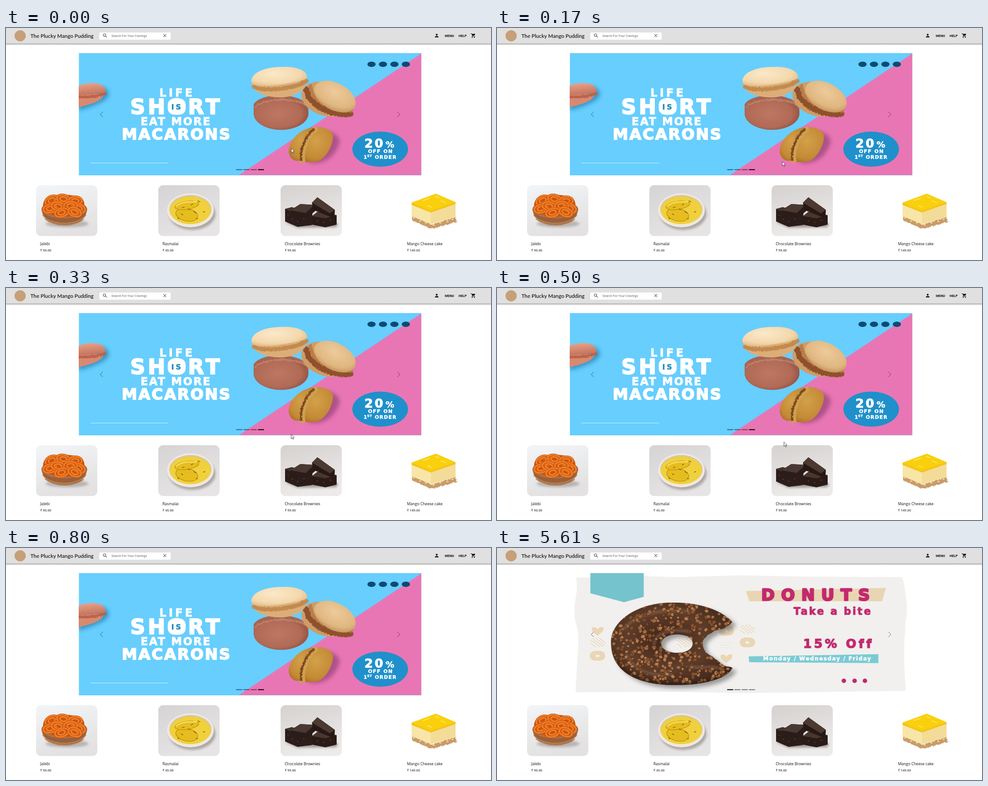
Animation, 1081 px wide and 518 px high, one loop 8 s. Source, as an HTML page:

```html
<!DOCTYPE html>
<html lang="en">
<head>
<meta charset="utf-8">
<title>Dessert shop</title>
<style>
html, body { margin: 0; width: 100%; height: 100%; overflow: hidden; background: #fff; }
svg { display: block; width: 100%; height: 100%; }
.brand { font: 600 11.7px Lato, sans-serif; fill: #1c1c1c; }
.hint { font: 7.1px Roboto, sans-serif; fill: #6a6a6a; }
.nav { font: 700 7.4px Roboto, sans-serif; fill: #111; }
.name { font: 500 8.6px "Open Sans", sans-serif; fill: #111; }
.price { font: 700 7.3px "Open Sans", sans-serif; fill: #666; }
.display { font-family: "DejaVu Sans", sans-serif; font-weight: 700; stroke-linejoin: round; }
.line { fill: none; stroke-linecap: round; stroke-linejoin: round; }
</style>
</head>
<body>
<svg viewBox="0 0 1081 518">
<defs>
  <filter id="rough" x="-50%" y="-50%" width="200%" height="200%" color-interpolation-filters="sRGB">
    <feTurbulence baseFrequency=".18" numOctaves="2" seed="4"/>
    <feDisplacementMap in="SourceGraphic" scale="6" xChannelSelector="R" yChannelSelector="G"/>
  </filter>
  <filter id="blur" x="-30%" y="-30%" width="160%" height="160%"><feGaussianBlur stdDeviation="5"/></filter>
  <filter id="soft" x="-30%" y="-50%" width="160%" height="200%"><feGaussianBlur stdDeviation="2.500"/></filter>
  <linearGradient id="barShade" x2="0" y2="1"><stop stop-color="#999"/><stop offset=".35" stop-color="#c9c9c9"/><stop offset="1" stop-color="#fff"/></linearGradient>
  <radialGradient id="cream" cx=".4" cy=".35" r=".7"><stop stop-color="#fbe9c9"/><stop offset=".7" stop-color="#f3d8ad"/><stop offset="1" stop-color="#e2b985"/></radialGradient>
  <radialGradient id="clay" cx=".45" cy=".5" r=".6"><stop stop-color="#bd7762"/><stop offset=".7" stop-color="#b06a55"/><stop offset="1" stop-color="#8f4d3d"/></radialGradient>
  <radialGradient id="tan" cx=".45" cy=".35" r=".7"><stop stop-color="#eecb9b"/><stop offset=".7" stop-color="#dfb680"/><stop offset="1" stop-color="#c08d55"/></radialGradient>
  <radialGradient id="mustard" cx=".5" cy=".4" r=".7"><stop stop-color="#d3a04a"/><stop offset=".7" stop-color="#c48a36"/><stop offset="1" stop-color="#a56c22"/></radialGradient>
  <linearGradient id="rose" x2=".2" y2="1"><stop stop-color="#eaa68c"/><stop offset="1" stop-color="#c4735c"/></linearGradient>
  <radialGradient id="choco" cx=".45" cy=".45" r=".6"><stop stop-color="#3b2319"/><stop offset=".55" stop-color="#5f3d2a"/><stop offset="1" stop-color="#422a1d"/></radialGradient>
  <linearGradient id="wall1" x2=".3" y2="1"><stop stop-color="#f2f5f8"/><stop offset="1" stop-color="#e3e1e1"/></linearGradient>
  <linearGradient id="wall2" x2=".5" y2="1"><stop stop-color="#d5d3d4"/><stop offset="1" stop-color="#e6e4e4"/></linearGradient>
  <linearGradient id="wall3" x2=".3" y2="1"><stop stop-color="#d4d1cf"/><stop offset="1" stop-color="#edebea"/></linearGradient>
  <clipPath id="frame"><path d="M162.500 56H925.500V328.500H162.500z"/></clipPath>
  <path id="ring" fill-rule="evenodd" d="M524 165C496 134 440 121 392 122C322 120 254 158 254 211C254 276 312 307 400 306C462 306 512 292 525 268C517 262 509 267 503 260C497 258 494 251 486 248C481 240 470 240 463 229C456 216 456 205 466 199C469 192 478 192 484 185C495 183 514 180 524 165zM366 214C366 202 381 193 401 193C422 193 436 201 436 213C436 226 421 234 402 234C382 234 366 226 366 214z"/>
  <clipPath id="ringClip"><use href="#ring" clip-rule="evenodd"/></clipPath>
  <path id="heart" d="M0 10C-6 5-14 0-13-6C-10-12-2-9 0-4C2-9 11-12 14-7C14 0 6 5 0 10z"/>
  <path id="hatch" class="line" stroke-width="1.500" d="M-16-6L4 10M-12-9L10 9M-5-10L15 7M3-10L16 1M-16 2L-6 10"/>
  <path id="loaf" fill-rule="evenodd" d="M-17 0C-17-9-9-12 1-11C12-12 17-7 17 0C17 8 9 12 0 10C-10 12-17 8-17 0zM-5 0C-4-4 4-4 5 0C4 4-4 4-5 0z"/>
</defs>

<g id="macarons" clip-path="url(#frame)">
  <path fill="#67cefe" d="M162.500 56h763v273h-763z"/>
  <path fill="#e976b4" d="M925.500 57V328.500H519z"/>
  <path d="M162 140L218 132C240 145 235 165 162 184z" fill="#2478a8" opacity=".65" filter="url(#blur)"/>
  <path d="M162 148L217 147C217 163 192 169 162 177z" fill="#d98970"/>
  <path d="M162 153C180 153 203 151 219 145" class="line" stroke="#b9644d" stroke-width="7" filter="url(#rough)"/>
  <path d="M162 129C180 120 207 121 217 130C225 139 223 147 206 146C190 149 176 149 162 150z" fill="url(#rose)"/>
  <g class="display" fill="#fff" stroke="#fff">
    <text x="342" y="152.500" font-size="24" letter-spacing="5.500">LIFE</text>
    <text x="277" y="192" font-size="46" letter-spacing="6" stroke-width="2.400">SHORT</text>
    <rect x="361" y="158" width="39" height="35" rx="13"/>
    <text x="368.500" y="182" font-size="16" letter-spacing="4" fill="#248dbd" stroke="#248dbd" stroke-width=".600">IS</text>
    <text x="300" y="216.500" font-size="24" letter-spacing="2.600">EAT MORE</text>
    <text x="258" y="249" font-size="34.500" letter-spacing="2.700" stroke-width="2">MACARONS</text>
  </g>
  <path d="M188 301.500H362" stroke="#d8f2ff" stroke-width="1.200"/>

  <path d="M552 170C570 143 655 143 674 174L674 195H552z" fill="#a9644e"/>
  <ellipse cx="613" cy="191" rx="61" ry="36.500" fill="url(#clay)"/>
  <path d="M554 176C568 154 655 152 672 175" class="line" stroke="#bb806a" stroke-width="4" filter="url(#rough)"/>
  <path d="M549 126C552 148 590 156 617 155C650 152 672 135 670 113z" fill="#dcae77"/>
  <path d="M551 130C575 141 640 135 668 117" class="line" stroke="#c28a4f" stroke-width="9" filter="url(#rough)"/>
  <path d="M547 121C545 95 590 86 615 87C650 85 673 97 671 110C668 118 630 124 600 128C575 131 550 130 547 121z" fill="url(#cream)"/>

  <ellipse cx="713" cy="159" rx="56" ry="37" transform="rotate(18 713 159)" fill="#cf9c66"/>
  <path d="M668 136C672 168 720 196 766 190" class="line" stroke="#8f512c" stroke-width="13" filter="url(#rough)"/>
  <path d="M677 128C680 162 725 187 770 183" class="line" stroke="#bb7c48" stroke-width="7" filter="url(#rough)"/>
  <ellipse cx="733" cy="153" rx="50" ry="30" transform="rotate(28 733 153)" fill="url(#tan)"/>

  <path d="M674 230C730 225 753 242 740 265C727 295 700 306 674 300z" fill="#7e3568" opacity=".55" filter="url(#blur)"/>
  <path d="M672 226C692 217 725 221 729 241C728 270 706 297 690 299C670 301 652 298 653 290z" fill="url(#mustard)"/>
  <path d="M683 222C649 228 630 255 630 276C632 293 645 299 655 296C652 270 666 237 683 222z" fill="url(#mustard)"/>
  <path d="M688 225C670 238 655 268 659 295" class="line" stroke="#d0a052" stroke-width="12" filter="url(#rough)"/>
  <path d="M684 225C667 238 653 268 656 294" class="line" stroke="#7d4a1b" stroke-width="5" filter="url(#rough)"/>

  <g id="badges" fill="#0b4b72"></g>
  <ellipse cx="834" cy="270.500" rx="62" ry="39.300" fill="#1f90cb"/>
  <g class="display" fill="#fff" stroke="#fff" stroke-width=".500">
    <text x="799" y="266.500" font-size="27" letter-spacing="4" stroke-width="1.200">20</text>
    <text x="846" y="267" font-size="19.500">%</text>
    <text x="807" y="279" font-size="11" letter-spacing="1.500">OFF ON</text>
    <text x="797" y="292" font-size="11">1</text>
    <text x="805" y="288" font-size="7" letter-spacing=".800">ST</text>
    <text x="822" y="292" font-size="11" letter-spacing="1.200">ORDER</text>
  </g>
</g>

<g id="donuts">
  <path fill="#f1f0ee" d="M177 66L240 66L330 63L400 65L545 61L700 64L903 65L907 78L914 128C914 155 909 165 910 185C906 210 909 235 907 255L911 319L830 320L700 322L540 324L400 321L175 322L180 230C182 200 182 185 176 170C171 150 172 135 174 120L178 95z"/>
  <path fill="#74c3cd" d="M208 56H327V109L283 121L208 101z"/>
  <g fill="#ead6b4" stroke="none">
    <use href="#heart" x="224" y="186"/><use href="#heart" x="511" y="247"/>
    <use href="#loaf" x="224" y="241"/><use href="#loaf" x="558" y="211"/><use href="#loaf" x="511" y="185"/>
  </g>
  <g stroke="#ead6b4">
    <use href="#hatch" x="225" y="211"/><use href="#hatch" x="558" y="181"/><use href="#hatch" x="418" y="212"/>
    <path d="M497 211h32M500 217h26M496 223h32" stroke-width="1.500" stroke-dasharray="1.500 5"/>
  </g>
  <use href="#ring" x="9" y="7" fill="#555" opacity=".55" filter="url(#blur)"/>
  <use href="#ring" fill="url(#choco)"/>
  <g clip-path="url(#ringClip)">
    <path d="M283 180C310 146 370 134 437 143M350 216C352 187 390 179 430 187M289 238C305 275 345 287 390 282M430 265C460 270 480 262 493 268" class="line" stroke="#96705a" stroke-width="5" opacity=".65" filter="url(#soft)"/>
    <g id="nuts"></g>
    <path d="M256 235C273 292 350 308 420 304C470 302 510 292 526 270" class="line" stroke="#26150e" stroke-width="10" opacity=".5" filter="url(#soft)"/>
  </g>
  <path fill="#e9d5b3" d="M555 96L867 89L858 119L562 119z"/>
  <path fill="#7bcbd4" d="M561 242L850 237V257L562 255z"/>
  <g class="display" fill="#c2296e" stroke="#c2296e">
    <text x="589" y="117" font-size="36" letter-spacing="14.300" stroke-width="3">DONUTS</text>
    <text x="661" y="149" font-size="22.500" letter-spacing="3.400" stroke-width="1.200">Take a bite</text>
    <text x="682.500" y="223" font-size="27" letter-spacing="5.300" stroke-width="1.600">15% Off</text>
    <text x="593" y="250.500" font-size="12" letter-spacing="1.650" fill="#fff" stroke="#fff" stroke-width=".500">Monday / Wednesday / Friday</text>
  </g>
  <g fill="#c2296e">
    <circle cx="773" cy="296.500" r="5"/><circle cx="797" cy="296.500" r="5"/><circle cx="820" cy="296.500" r="5"/>
  </g>
</g>

<g class="line" stroke="#222" stroke-opacity=".65" stroke-width="1">
  <path id="prev" d="M215.500 187.500L210 193L215.500 198.500"/>
  <path id="next" d="M872.500 187.500L878 193L872.500 198.500"/>
</g>
<g id="dots"></g>

<path fill="#e0e0e0" d="M0 0H1081V34.500H0z"/>
<path fill="url(#barShade)" d="M0 34.500H1081V39H0z"/>
<circle cx="31.500" cy="17.500" r="12.500" fill="#c5a078"/>
<text class="brand" x="54.500" y="22">The Plucky Mango Pudding</text>
<rect x="208" y="10" width="159" height="16" rx="2" fill="#fff"/>
<g class="line" stroke="#555" stroke-width="1.100">
  <circle cx="219.500" cy="15.800" r="2.800"/><path d="M221.700 18L224.500 20.800"/>
  <path d="M351.200 14.200L356.800 19.800M356.800 14.200L351.200 19.800"/>
</g>
<text class="hint" x="235" y="20">Search For Your Cravings</text>
<g fill="#111">
  <circle cx="960" cy="15" r="2.100"/><path d="M956 21V20C956 17.200 964 17.200 964 20V21z"/>
  <circle cx="1039" cy="21" r="1.050"/><circle cx="1044" cy="21" r="1.050"/>
  <path d="M1038 13H1046L1043.800 17.300H1039.800z"/>
  <path d="M1036 12.500H1037.600L1039.700 17L1038.500 19H1045" class="line" stroke="#111"/>
</g>
<text class="nav" x="978" y="19.600">MENU</text>
<text class="nav" x="1008.700" y="19.600">HELP</text>

<g id="cards"></g>

<g id="jalebi">
  <ellipse cx="136" cy="437" rx="48" ry="8" fill="#8b8585" opacity=".5" filter="url(#soft)"/>
  <path d="M79 404C82 428 100 441 131 441C160 441 178 428 181 404z" fill="#98603b"/>
  <path d="M82 418C100 442 160 442 178 418M87 426C105 444 157 443 173 427" class="line" stroke="#c08a5d" stroke-width="2" stroke-dasharray="2 1.500"/>
  <ellipse cx="130" cy="405" rx="51" ry="20" fill="#ad7148"/>
  <path d="M84 404C79 387 90 373 110 375C132 370 158 372 172 384C181 402 167 415 150 420C125 424 95 420 84 404z" fill="#c9550f"/>
</g>

<g>
  <ellipse cx="415" cy="415" rx="52" ry="36" fill="#77706c" opacity=".5" filter="url(#soft)"/>
  <ellipse cx="411" cy="407" rx="52" ry="38" fill="#efe8de"/>
  <ellipse cx="411" cy="405" rx="47" ry="32" fill="#d2c4ad"/>
  <ellipse cx="411" cy="407" rx="46" ry="31" fill="#f0d03c"/>
  <g fill="#e6bd1e" stroke="#b98d16" stroke-width="1.200">
    <ellipse cx="403" cy="417" rx="25" ry="14" transform="rotate(12 403 417)"/>
    <ellipse cx="403" cy="396" rx="27" ry="9" transform="rotate(-9 403 396)"/>
  </g>
  <path d="M380 397C393 387 410 388 424 388" class="line" stroke="#f9df5b" stroke-width="3"/>
  <path d="M393 401l4-1M406 404l3 2M413 395l3-2M419 410l5 3M391 415l3 2M428 386l4 2M440 411l3-1M383 424l2 2M424 425l3 1" class="line" stroke="#8d6812" stroke-width="1.800"/>
</g>

<g stroke-linejoin="round">
  <path d="M622 434L650 446L736 445L741 437L690 425z" fill="#6f6763" opacity=".6" filter="url(#soft)"/>
  <path d="M622 404L637 400L683 414L682 440L650 444L622 432z" fill="#2b1d1a"/>
  <path d="M622 404L637 400L683 414L655 420z" fill="#45332e"/>
  <path d="M634 407L656 393L687 395L689 409L668 426L636 417z" fill="#2a1c19"/>
  <path d="M634 407L656 393L687 395L668 413z" fill="#4a3933"/>
  <path d="M682 420L696 409L737 418V439L712 445L682 439z" fill="#2a1b17"/>
  <path d="M682 420L696 409L737 418L712 425z" fill="#49372f"/>
  <path d="M682 390L694 378L733 406L732 425L684 406z" fill="#261815"/>
  <path d="M682 390L694 378L733 406L722 414z" fill="#4c3932"/>
  <path d="M628 418h1m8 9h2m10 5h2m12-6h2m28 5h2m12 3h2m13-5h2m-30-20h2" class="line" stroke="#69483a" stroke-width="1.500"/>
</g>

<g>
  <path d="M904 417L947 437L1002 421L1003 431L947 447L903 428z" fill="#c99b67" filter="url(#rough)"/>
  <path d="M904 392L947 408V438L904 420z" fill="#f8e6a8"/>
  <path d="M947 408L1002 390V422L947 438z" fill="#f3dc98"/>
  <path d="M904 390L958 370L1002 389V393L947 412L904 395z" fill="#f5c21a"/>
  <path d="M904 390L958 370L1002 389L947 408z" fill="#f9d00b"/>
  <path d="M930 385l14-5M957 376l8 3M970 386l10 4M940 397l8 3" class="line" stroke="#fde365" stroke-width="2"/>
  <path d="M908 424h2m12 7h2m11 4h2m15 5h2m13-5h2m14-3h2m9-5h2" class="line" stroke="#f1d09c" stroke-width="3"/>
</g>

<path id="cursor" d="M0 0V10L2.400 7.900L4 11.500L5.600 10.800L4.100 7.300H7z" fill="#fff" stroke="#222" stroke-width=".800"/>
</svg>
<script>
const LOOP = 8000, SLIDE = 5530, SETTLE = 5610;
const byId = id => document.getElementById(id);

function add(parent, tag, attrs, text) {
  const el = document.createElementNS('http://www.w3.org/2000/svg', tag);
  for (const key in attrs) el.setAttribute(key, attrs[key]);
  if (text) el.textContent = text;
  return parent.appendChild(el);
}

function seeded(seed) {
  return () => (seed = seed * 16807 % 2147483647) / 2147483647;
}

// Hold each listed state until the next one.
function play(el, steps) {
  const frames = steps.map(([time, state]) => ({ offset: time / LOOP, easing: 'steps(1, end)', ...state }));
  frames.push({ ...frames.at(-1), offset: 1 });
  el.animate(frames, { duration: LOOP, iterations: Infinity });
}

const move = (x, y = 0) => ({ transform: `translate(${x}px, ${y}px)` });
const fade = opacity => ({ opacity });

[['Jalebi', '90.00', 'url(#wall1)'], ['Rasmalai', '45.00', 'url(#wall2)'],
 ['Chocolate Brownies', '99.00', 'url(#wall3)'], ['Mango Cheese cake', '149.00', '#fff']]
.forEach(([name, price, fill], i) => {
  const x = 67 + i * 272.5, cards = byId('cards');
  add(cards, 'rect', { x, y: 351, width: 136.5, height: 113.5, rx: 11, fill });
  add(cards, 'text', { class: 'name', x: x + 9.2, y: 485 }, name);
  add(cards, 'text', { class: 'price', x: x + 9.2, y: 498.6 }, '₹ ' + price);
});

for (let i = 0; i < 4; i++) add(byId('badges'), 'ellipse', { cx: 814.7 + i * 25.5, cy: 81, rx: 9.2, ry: 6 });

// Fried coils, back row first.
[[102, 385], [128, 382], [154, 386], [98, 403], [162, 402], [116, 398], [144, 397], [124, 412], [153, 411]]
.forEach(([cx, cy], i) => {
  for (const r of [15, 8]) {
    const shape = { cx, cy, rx: r, ry: r * .62, fill: 'none', transform: `rotate(${i * 37 % 50 - 25} ${cx} ${cy})` };
    add(byId('jalebi'), 'ellipse', { ...shape, stroke: '#c04a0b', 'stroke-width': 5.4 });
    add(byId('jalebi'), 'ellipse', { ...shape, stroke: '#f07d24', 'stroke-width': 3.8 });
  }
});

const rand = seeded(73);
for (let i = 0; i < 520; i++) {
  const x = 255 + rand() * 270, y = 123 + rand() * 180, size = 3 + rand() * 2.6;
  add(byId('nuts'), 'path', {
    d: `M${-size} 0L${-size * .3} ${-size * .8}L${size} ${-size * .4}L${size * .7} ${size * .7}L${-size * .5} ${size * .7}z`,
    transform: `translate(${x} ${y}) rotate(${rand() * 360})`,
    fill: ['#a06a42', '#b57d50', '#85512f'][i % 3], stroke: '#432515', 'stroke-width': .6
  });
}

const dots = [0, 1, 2, 3].map(i => add(byId('dots'), 'rect',
  { x: 513 + i * 16.2, y: 315.3, width: 13.5, height: 2, opacity: .5 }));
play(dots[0], [[0, fade(.5)], [SLIDE, fade(1)]]);
play(dots[3], [[0, fade(1)], [SLIDE, fade(.5)]]);

play(byId('macarons'), [[0, fade(1)], [SLIDE, fade(0)]]);
play(byId('donuts'), [
  [0, { ...fade(0), ...move(-163.7) }],
  [SLIDE, { ...fade(1), ...move(-163.7) }],
  [SETTLE, { ...fade(1), ...move(0) }]
]);
play(byId('prev'), [[0, move(0)], [SLIDE, move(-139)], [SETTLE, move(0)]]);
play(byId('next'), [[0, move(0)], [SLIDE, move(139)], [SETTLE, move(0)]]);

play(byId('cursor'), [
  [0, 636, 268.5], [130, 636, 283.5], [170, 636, 298], [270, 636, 318], [330, 635.5, 326.5],
  [500, 639.5, 343.5], [570, 657.5, 447.5], [640, 728.5, 487], [800, 728.5, 487, 0]
].map(([time, x, y, shown = 1]) => [time, { ...move(x, y), ...fade(shown) }]));
</script>
</body>
</html>
```
